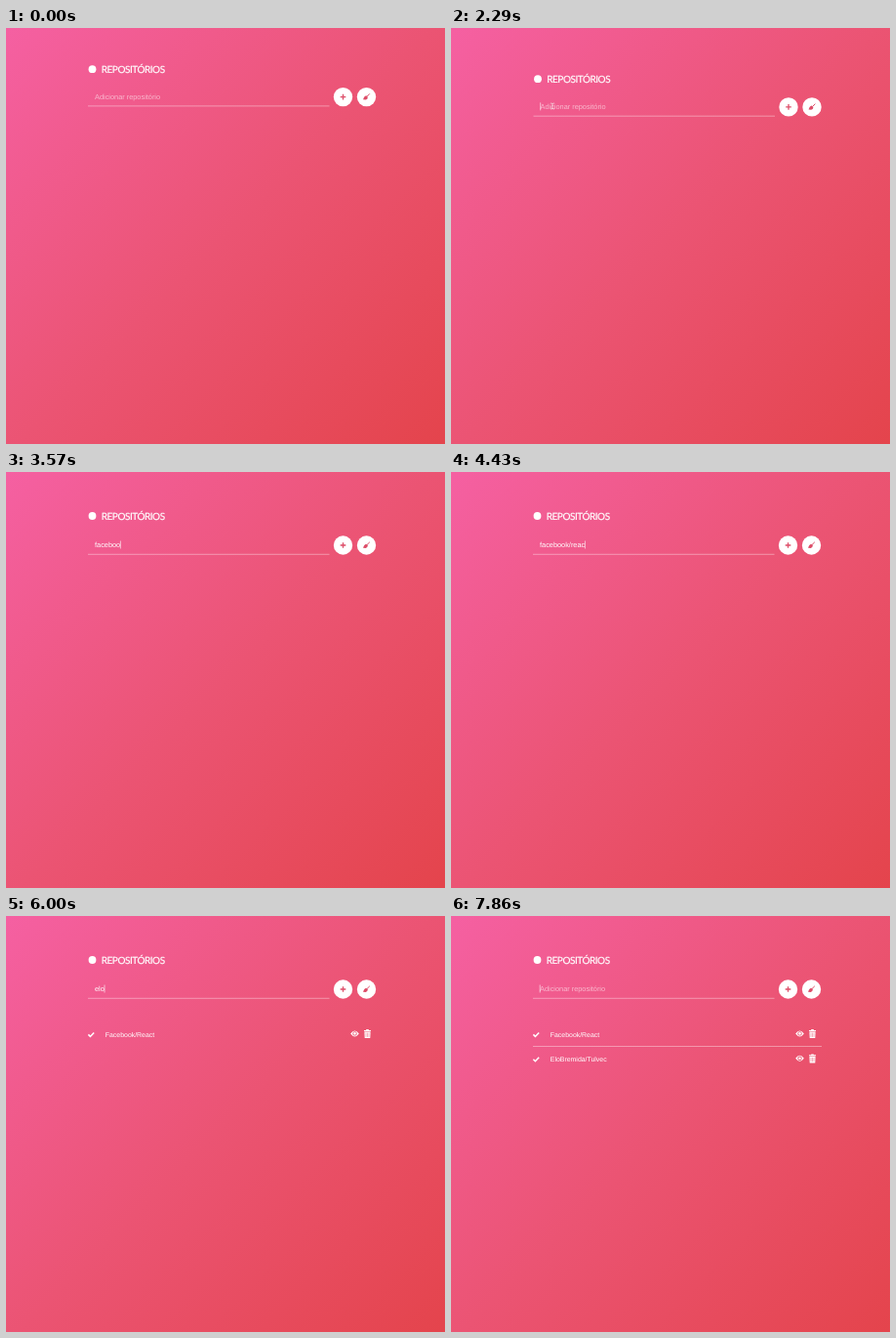
These frames come from a looping animation (450x426 px, 8000 ms). An HTML page:

```html
<!DOCTYPE html>
<html lang="pt">
<head>
<meta charset="utf-8">
<title>Repositórios</title>
<style>
  html, body { margin: 0; width: 100%; height: 100%; overflow: hidden; }
  body { background: linear-gradient(135deg, #f560a2, #eb5473 50%, #e4444c); }
  svg { display: block; width: 100%; height: 100%; fill: #fff; }
  text { font: 7.37px "Liberation Sans", Arial, sans-serif; text-rendering: geometricPrecision; white-space: pre; }
  .title { font: 10px Lato, sans-serif; letter-spacing: -.45px; stroke: #fff; stroke-width: .2px; }
  .item { font-size: 6.93px; }
  .rule { stroke: #fff; stroke-width: .8; stroke-opacity: .48; }
  .pink { fill: #dd4d68; }
  .stroke { fill: none; stroke: #fff; stroke-width: 1.5; }
  .pink-stroke { fill: none; stroke: #dd4d68; stroke-width: 1.3; }
</style>
</head>
<body>
<svg viewBox="0 0 450 426">
  <defs>
    <g id="row">
      <path class="stroke" d="M84.4 .4l2 2 3.8-4"/>
      <path fill-rule="evenodd" d="M353.2-.6q4.3-6 8.6 0q-4.3 6-8.6 0zM355.3-.6a2.2 2.2 0 0 0 4.4 0a2.2 2.2 0 0 0-4.4 0z"/>
      <circle cx="357.5" cy="-.6" r="1.3"/>
      <path d="M367-4.1h2l.4-.8h2.2l.4.8h2v1.1h-7zM367.4-2.5h6.2l-.3 6.6h-5.6z"/>
      <path d="M369-1.4v4.3m1.5-4.3v4.3m1.5-4.3v4.3" stroke="#e9617b" stroke-width=".5"/>
    </g>
  </defs>

  <g id="heading">
    <circle cx="88.5" cy="0" r="3.9"/>
    <text class="title" x="97.7" y="3.6">REPOSITÓRIOS</text>
  </g>

  <g id="form">
    <path class="rule" d="M84 9.3H331.5"/>
    <text id="hint" x="91" y="2.2" fill-opacity=".58">Adicionar repositório</text>
    <text id="typed" x="91" y="2.2"></text>
    <path id="caret" stroke="#fff" stroke-width=".7" stroke-opacity=".85" d="M0-4.5V3.5"/>
    <g transform="translate(345.5 0)">
      <circle r="9.7"/>
      <path id="plus" class="pink-stroke" d="M-2.8 0H2.8M0-2.8V2.8"/>
      <circle id="spinner" class="pink-stroke" r="2.6" stroke-dasharray="12 4.3"/>
    </g>
    <g transform="translate(369.5 0)">
      <circle r="9.7"/>
      <path class="pink-stroke" style="stroke-width:1" d="M3.3-3.2L.4-.3"/>
      <path class="pink" d="M-.2-1.3L1.4.3Q1.2 2.6-.8 2.9L-3.4 2.7Q-2.6-.9-.2-1.3z"/>
    </g>
  </g>

  <g id="first" transform="translate(0 121)">
    <use href="#row"/>
    <text class="item" x="101.8" y="2.8">Facebook/React</text>
  </g>
  <g id="second" transform="translate(0 146.3)">
    <path class="rule" d="M84-12.8H380"/>
    <use href="#row"/>
    <text class="item" x="101.8" y="2.8">EloBremida/Tulvec</text>
  </g>

  <path id="arrow" fill="#111" stroke="#fff" stroke-width=".6" d="M0 0V7.2L1.7 5.7 2.8 8.2 4 7.6 2.9 5.3H5.1z"/>
  <path id="beam" fill="none" stroke="#f3dfe4" stroke-width=".8" d="M-1.8-3Q0-3 0-2Q0-3 1.8-3M0-2V2M-1.8 3Q0 3 0 2Q0 3 1.8 3"/>
</svg>
<script>
const LOOP = 8000, STEP = 1000 / 7;
const ui = Object.fromEntries([...document.querySelectorAll('svg > [id], #form [id]')].map(e => [e.id, e]));

// Linear interpolation through [step, value] pairs
function track(k, keys) {
  if (k <= keys[0][0]) return keys[0][1];
  for (let i = 1; i < keys.length; i++) {
    const [k0, a] = keys[i - 1], [k1, b] = keys[i];
    if (k <= k1) return a + (b - a) * (k - k0) / (k1 - k0);
  }
  return keys.at(-1)[1];
}
const within = (k, from, to) => k >= from && k < to;
const show = (el, on) => el.setAttribute('visibility', on ? 'visible' : 'hidden');
const place = (el, x, y) => el.setAttribute('transform', `translate(${x} ${y})`);

function typedText(k) {
  if (k < 36) {
    const count = track(k, [[17, 0], [20, 5], [21, 5], [27, 9], [28, 9], [31, 13], [32, 14]]);
    return 'facebook/react'.slice(0, count + .01);
  }
  if (k < 53) return 'elobremida/tulvec'.slice(0, track(k, [[39, 0], [42, 3], [51, 17]]) + .01);
  return '';
}

function draw(time) {
  const k = Math.floor((time % LOOP + 5) / STEP);

  const shift = track(k, [[0, 0], [2, .5], [17, .5], [20, 0]]);
  place(ui.heading, shift, track(k, [[0, 42.2], [2, 52.2], [17, 52.2], [20, 45]]));
  place(ui.form, shift, track(k, [[0, 70.6], [2, 80.9], [17, 80.9], [20, 75]]));

  const text = typedText(k);
  const loading = within(k, 33, 36) || k === 52;
  ui.typed.textContent = text;
  show(ui.hint, !text);
  show(ui.caret, !loading && (text || within(k, 16, 18) || within(k, 38, 40) || k >= 55));
  place(ui.caret, 91.2 + (text ? ui.typed.getComputedTextLength() : 0), 0);

  show(ui.plus, !loading);
  show(ui.spinner, loading);
  ui.spinner.setAttribute('transform', `rotate(${k * 52})`);
  show(ui.first, k >= 36);
  show(ui.second, k >= 53);

  const x = track(k, [[9, 59], [13, 104]]), y = track(k, [[9, 89.6], [13, 80]]);
  const pointing = x < 84;
  place(ui.arrow, x, y);
  place(ui.beam, x, y);
  show(ui.arrow, k >= 9 && pointing);
  show(ui.beam, k < 22 && !pointing);
}

const start = performance.now();
function tick() {
  draw(performance.now() - start);
  requestAnimationFrame(tick);
}
tick();
</script>
</body>
</html>
```
